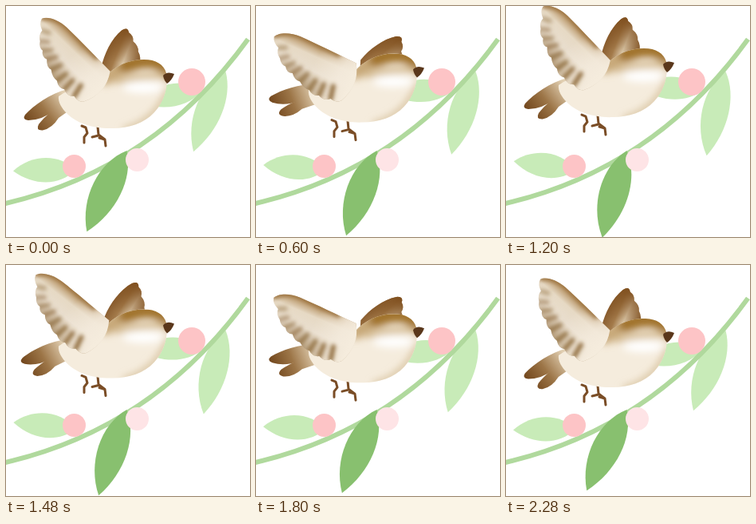
Write an HTML page that moves like this. It is 306 px wide and 289 px high and loops after 2.32 s.

```html
<!DOCTYPE html>
<html lang="en">
<head>
<meta charset="utf-8">
<title>Bird and branch</title>
<style>
html, body { margin: 0; width: 100%; height: 100%; overflow: hidden; background: #fff; }
svg { display: block; width: 100vw; height: 100vh; }
</style>
</head>
<body>
<svg viewBox="0 0 306 289" fill="none" stroke-linecap="round" stroke-linejoin="round">
  <defs>
    <filter id="soft" x="-50%" y="-50%" width="200%" height="200%"><feGaussianBlur stdDeviation="5"/></filter>
    <filter id="fine" x="-50%" y="-50%" width="200%" height="200%"><feGaussianBlur stdDeviation="2.8"/></filter>
    <linearGradient id="wingFill" gradientUnits="userSpaceOnUse" x1="99" y1="47" x2="60" y2="86">
      <stop offset="0" stop-color="#b08a58"/><stop offset=".28" stop-color="#e6d9c4"/>
      <stop offset=".6" stop-color="#e9dece"/><stop offset="1" stop-color="#b39a78"/>
    </linearGradient>
    <linearGradient id="wingRoot" gradientUnits="userSpaceOnUse" x1="114" y1="106" x2="80" y2="64">
      <stop offset="0" stop-color="#f5ecdd"/><stop offset=".35" stop-color="#f4ebdd" stop-opacity=".85"/>
      <stop offset="1" stop-color="#f4ebdd" stop-opacity="0"/>
    </linearGradient>
    <linearGradient id="farFill" gradientUnits="userSpaceOnUse" x1="126" y1="52" x2="168" y2="70">
      <stop offset="0" stop-color="#84572a"/><stop offset=".35" stop-color="#a37a4a"/>
      <stop offset=".6" stop-color="#d9c5a6"/><stop offset="1" stop-color="#8a5f32"/>
    </linearGradient>
    <linearGradient id="farTip" gradientUnits="userSpaceOnUse" x1="155" y1="30" x2="146" y2="72">
      <stop offset="0" stop-color="#80501f"/><stop offset="1" stop-color="#80501f" stop-opacity="0"/>
    </linearGradient>
    <linearGradient id="tailFill" gradientUnits="userSpaceOnUse" x1="29" y1="146" x2="74" y2="112">
      <stop offset="0" stop-color="#74491f"/><stop offset=".45" stop-color="#9c7547"/><stop offset="1" stop-color="#e2d0b3"/>
    </linearGradient>
    <path id="bodyShape" d="M66 113C80 103 105 95 124 89C136 75 154 67 173 67C188 67 198 73 201 84C204 99 199 119 186 133C173 147 154 153 134 153C111 154 88 147 76 134C70 128 65 120 66 113Z"/>
    <path id="wingShape" d="M131 82C112 62 95 43 78 26C68 16 54 11 47 14Q43 20 47 29Q42 34 44 42Q42 50 47 54Q45 62 52 65Q51 75 57 78Q58 88 64 92Q65 101 73 103Q76 112 85 112Q90 120 97 119C115 113 127 101 131 82Z"/>
    <path id="farShape" d="M120 77C124 60 134 41 147 31Q155 26 156 34Q162 38 161 45Q168 51 167 58Q171 65 168 76L150 98L128 96Z"/>
    <clipPath id="bodyClip"><use href="#bodyShape"/></clipPath>
    <clipPath id="wingClip"><use href="#wingShape"/></clipPath>
  </defs>

  <g id="leaves"></g>
  <path d="M-3 247.500Q185 205 303.500 41.500" stroke="#b0d99d" stroke-width="6" stroke-linecap="butt"/>
  <g id="front"></g>
  <circle cx="85.500" cy="200.500" r="14.500" fill="#fdc4c6"/>
  <circle cx="164.500" cy="192.500" r="14.500" fill="#fee4e6"/>
  <circle cx="233" cy="95" r="17" fill="#fdc4c6"/>

  <g id="bird">
    <g id="farWing">
      <use href="#farShape" fill="url(#farFill)"/>
      <use href="#farShape" fill="url(#farTip)"/>
    </g>
    <g id="tail" fill="url(#tailFill)">
      <path d="M78 118C62 126 48 139 41 148Q37 156 46 155.500Q58 153 66 140L86 126Z"/>
      <path d="M77 104C55 110 35 124 24 136Q20 142 28 143Q45 143 60 131L82 119Z"/>
    </g>
    <g stroke="#7a4d26" stroke-width="3">
      <path d="M95 150L100 152L102 159L98 164L98 171"/>
      <path d="M115 151L116 161L124 167L125 175M108 164L116 162M117 165L124 167"/>
    </g>
    <use href="#bodyShape" fill="#f5ecdd"/>
    <g clip-path="url(#bodyClip)">
      <g filter="url(#soft)">
        <path d="M150 155Q188 144 203 106" stroke="#d9c5a3" stroke-width="8"/>
        <path d="M126 90Q140 77 156 74" stroke="#c7a878" stroke-width="18"/>
        <path d="M150 74Q172 66 186 69T204 84" stroke="#a0722c" stroke-width="19"/>
        <path d="M140 94Q164 86 199 87" stroke="#d2b88d" stroke-width="7"/>
        <ellipse cx="172" cy="102" rx="25" ry="7" fill="#fff"/>
      </g>
    </g>
    <path d="M197 87Q202 81 211 85Q208 93 202 97Q198 93 197 87Z" fill="#5a371b"/>
    <g id="wing">
      <use href="#wingShape" fill="url(#wingFill)"/>
      <use href="#wingShape" fill="url(#wingRoot)"/>
      <g clip-path="url(#wingClip)">
        <g id="feathers" filter="url(#fine)" stroke="#86612f" stroke-width="6"></g>
        <path d="M48 13Q70 13 84 31L114 64" stroke="#9c7340" stroke-width="6" filter="url(#fine)"/>
      </g>
    </g>
  </g>
</svg>
<script>
const PERIOD = 2320, STEP = 40;
const $ = id => document.getElementById(id);

function add(parent, d, attrs = {}) {
  const path = document.createElementNS('http://www.w3.org/2000/svg', 'path');
  path.setAttribute('d', d);
  for (const key in attrs) path.setAttribute(key, attrs[key]);
  return parent.appendChild(path);
}

// Each leaf hangs from (x, y) and swings around its resting angle; its two sides bulge differently.
function leaf(parent, x, y, length, full, slim, angle, swing, fill) {
  const f = full * 1.34, s = slim * 1.34, a = length * .25;
  const d = `M0 0C${a} ${f} ${length * .7} ${f} ${length} 0C${length * .66} ${-s} ${a} ${-s} 0 0Z`;
  const el = add(parent, d, { fill });
  return c => el.setAttribute('transform', `translate(${x} ${y}) rotate(${angle + swing * c})`);
}

const pale = '#c8ebb8';
const leaves = [
  leaf($('leaves'), 246, 106, 78, 16, 12, 175.5, -7, pale),
  leaf($('leaves'), 275.5, 82, 108, 18, 15, 107.3, 4.7, pale),
  leaf($('leaves'), 87, 205, 78, 15.5, 14.7, 183.5, -4.6, pale),
  leaf($('front'), 151.5, 181, 113, 19.3, 17, 111, 5.4, '#88c06f')
];

// Soft streaks fan out from the notches of the wing's trailing edge
[[47, 29], [44, 42], [47, 54], [52, 65], [57, 78], [64, 92], [73, 103], [85, 112]].forEach(([x, y], i) => {
  const angle = (20 - 11 * i) * Math.PI / 180, reach = 9 + i;
  add($('feathers'), `M${x} ${y}l${reach * Math.cos(angle)} ${reach * Math.sin(angle)}`, { opacity: .45 + .06 * i });
});

const wave = (t, period, lag) => Math.cos(2 * Math.PI * (t - lag) / period);
const turn = (id, angle, x, y) => $(id).setAttribute('transform', `rotate(${angle} ${x} ${y})`);

function draw(now) {
  const t = Math.floor(now % PERIOD / STEP) * STEP, flap = PERIOD / 2;
  const sway = wave(t, PERIOD, -58);
  leaves.forEach(place => place(sway));
  $('bird').setAttribute('transform', `translate(0 ${7 * wave(t, PERIOD, 0) - 7})`);
  turn('wing', 11 * wave(t, flap, 95) - 11, 120, 95);
  turn('farWing', 12 - 14.5 * wave(t, flap, 65), 130, 100);
  turn('tail', 8.4 - 8.4 * wave(t, flap, 20), 75, 110);
}

let start;
function tick(now) {
  start ??= now;
  draw(now - start);
  requestAnimationFrame(tick);
}
draw(0);
requestAnimationFrame(tick);
</script>
</body>
</html>
```
